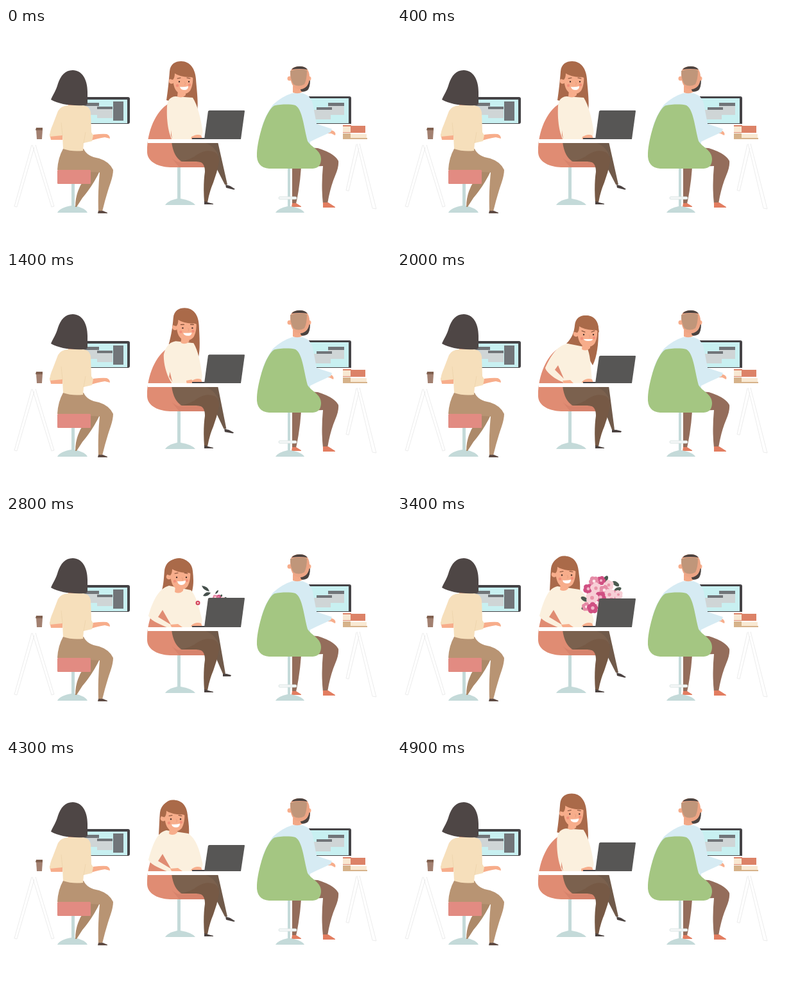
Animation, 600 px wide and 338 px high, one loop 5000 ms. Source, as an HTML page:

```html
<!DOCTYPE html>
<html lang="en">
<head>
<meta charset="utf-8">
<title>Office desks</title>
<style>
html, body { margin: 0; width: 100%; height: 100%; overflow: hidden; background: #fff; }
svg { display: block; width: 100vw; height: 100vh; }
.dark { fill: #454346; }
.screen { fill: #c8f0f1; }
.bar { fill: #717579; }
.pane { fill: #cfd5d6; }
.skin { fill: #f7ad8b; }
.steel { fill: #c4dad9; }
.chair { fill: #e08c73; }
.trestle { fill: none; stroke: #ececec; stroke-width: 1; }
.line { fill: none; stroke: #ecd3ab; stroke-width: .8; }
.brow { fill: none; stroke: #7b4a34; stroke-width: 1.1; stroke-linecap: round; }
</style>
</head>
<body>
<svg viewBox="0 0 600 338" preserveAspectRatio="none">
  <!-- left desk -->
  <path class="trestle" d="M40 183L13 279L17 280L44 187M41 183L71 280L75 279L46 183"/>
  <path class="dark" d="M116 108H190Q193 108 193 111V147Q193 150 190 150H116Z"/>
  <path class="screen" d="M113 112H189V149H113Z"/>
  <path class="pane" d="M121 122H145V136H121ZM142 127H166V141H142Z"/>
  <path class="bar" d="M121 117H145V122H121ZM142 123H166V127H142ZM167 115H183V145H167Z"/>
  <path fill="#a28070" d="M47 159H57L56 174H48Z"/>
  <path fill="#80604f" d="M47 156H57V160H46Z"/>
  <path class="steel" d="M102 244H107V278Q124 282 127 289H80Q84 281 102 278Z"/>
  <path fill="#ac8969" d="M120 222H147Q136 246 119 266L110 280H108Q108 257 121 238Z"/>
  <path fill="#b89473" d="M89 189H121Q126 201 145 204Q161 209 167 222Q167 230 163 242Q156 262 150 287H144Q143 256 146 226L80 222Q81 203 89 189Z"/>
  <path fill="#5d4a43" d="M144 286H151L158 289V290H143Z"/>
  <rect x="80" y="222" width="52" height="22" rx="1.5" fill="#e28b82"/>
  <path class="skin" d="M68 166L88 168V175H70ZM121 170Q142 165 157 166Q162 168 162 173L154 171Q141 173 123 179Z"/>
  <path class="skin" d="M97 112H115V126H97Z"/>
  <path fill="#f6dfbb" d="M97 121H118Q130 121 132 132L133 163L136 168L134 177L121 180L120 192Q103 194 89 189L88 168L68 170Q68 162 73 151L81 130Q85 122 97 121Z"/>
  <path class="line" d="M88 168L86 148M121 180L124 163"/>
  <path fill="#4e4645" d="M104 66C118 66 127 80 127 100V117Q127 121 122 121C100 122 82 119 70 112C74 103 78 98 81 87C85 75 92 66 104 66Z"/>

  <!-- middle desk -->
  <path class="chair" d="M254 118C232 130 219 166 220 195C221 211 240 218 258 218H309Q315 217 314 210L270 190Z"/>
  <path fill="#cf7c66" d="M258 203Q266 212 280 210H313Q314 217 309 218H270Z" opacity=".55"/>
  <path class="steel" d="M267 218H272V267Q290 270 295 277H248Q252 270 267 267Z"/>
  <path id="rearLeg" fill="#705a4a"/>
  <path id="rearShoe" fill="#4b4240"/>
  <path fill="#7b614e" d="M258 178H306Q326 184 331 200L314 213Q300 207 274 209Q261 202 258 178Z"/>
  <path fill="#765945" d="M270 209Q287 207 298 198Q312 189 325 194Q333 199 332 210Q329 226 323 242Q317 256 314 273H309Q307 245 310 225Q310 211 301 209Z"/>
  <path fill="#4b4240" d="M309 271L315 273L323 275V276H309Z"/>
  <path id="hair" fill="#a9694a"/>
  <path id="torso" fill="#fbf0de"/>
  <path id="gap" class="chair"/>
  <path id="hand" class="skin"/>
  <g id="head">
    <path class="skin" d="M268 98H280V105Q274 111 267 107Z"/>
    <circle class="skin" cx="258" cy="83" r="4.3"/>
    <path class="skin" d="M260 68H291C292 82 291 91 287 98C282 105 271 105 266 99C260 92 260 80 260 68Z"/>
    <path fill="#aa6a49" d="M256 80C255 64 262 54 273 54C286 54 293 63 294 81Q291 76 285 77Q270 76 263 71Q263 78 260 81Z"/>
    <g fill="#47312c"><circle cx="270" cy="84" r="1.2"/><circle cx="285" cy="84" r="1.2"/></g>
    <g fill="#f2907a"><circle cx="267" cy="90" r="2.2"/><circle cx="286" cy="89" r="2.2"/></g>
    <path d="M278 84Q281 88 278 89" fill="none" stroke="#e39a7b" stroke-width=".8"/>
    <path id="brows" class="brow"/>
    <path id="mouth" fill="#fff"/>
  </g>
  <g id="bouquet"></g>
  <g id="buds">
    <path fill="#46504c" d="M305 109Q315 110 317 118Q308 117 305 109ZM307 125Q311 117 319 120Q315 127 307 125ZM326 122Q327 117 331 116Q331 121 326 122Z"/>
    <circle cx="299" cy="136" r="3.5" fill="#d4475f"/><circle cx="299" cy="136" r="1.3" fill="#fbe3dc"/>
  </g>
  <path class="skin" d="M289 171Q296 165 304 168L306 173H288Z"/>
  <path fill="#454346" d="M290 172H312V174H290Z"/>
  <path id="lid" fill="#575655"/>
  <path fill="#fff" d="M221 174H372V180H221Z"/>

  <!-- right desk -->
  <path class="trestle" d="M546 182L530 254L534 255L550 188M547 181L571 282L577 283L551 181"/>
  <path class="dark" d="M472 107H535Q538 107 538 110V150H472Z"/>
  <path class="screen" d="M474 110H534V149H474Z"/>
  <path class="pane" d="M502 121H527V136H502ZM480 128H506V143H480Z"/>
  <path class="bar" d="M502 117H527V122H502ZM484 124H508V128H484Z"/>
  <path fill="#dc8267" d="M537 153H560V164H537ZM525 152H538V154H525ZM525 163H538V164H525Z"/>
  <path fill="#f8e8d2" d="M525 154H537V163H525ZM537 166H562V173H537Z"/>
  <path fill="#d6b28a" d="M525 165H537V174H525ZM537 172H563V174H537Z"/>
  <path fill="#946d5b" d="M446 218H460Q458 248 452 275H446ZM470 187L486 188Q512 196 518 208Q519 217 513 231Q505 250 501 275H494Q491 247 494 216L470 217Z"/>
  <path fill="#e27d60" d="M446 274H452L460 279V280H445ZM494 273H502L513 280V281H494Z"/>
  <path class="steel" d="M439 219H443V279Q461 282 465 289H420Q424 282 439 279Z"/>
  <rect x="425" y="264" width="28" height="4" rx="2" fill="#f4f7f7" stroke="#d5e0df" stroke-width=".8"/>
  <path id="reach" class="skin" d="M496 160Q505 158 511 161Q516 164 514 168L508 165L496 165Z"/>
  <path fill="#d6ebf3" d="M446 102H462Q475 106 478 118L484 150L508 158L506 163L484 173L474 178V192H410L398 158Q402 140 416 120Q430 107 446 102Z"/>
  <path fill="#f2a887" d="M447 91H462V100Q456 104 447 101Z"/>
  <path fill="#4b4340" d="M458 94L474 80Q474 95 469 98Q463 101 460 99Z"/>
  <g class="skin"><circle cx="442" cy="79" r="3.5"/><circle cx="472" cy="79" r="3.5"/></g>
  <path fill="#eda585" d="M443 72C443 62 450 60 458 60C468 60 473 66 473 77C473 89 467 95 459 96C449 96 443 89 443 72Z"/>
  <path fill="#c0967a" d="M443 67Q457 63 469 66Q469 80 465 88Q456 93 448 88Q443 80 443 67Z"/>
  <path fill="#4b4340" d="M445 65Q449 60 458 60Q466 60 470 65Q457 63 445 65Z"/>
  <path fill="#a4c682" d="M418 121.500C430 119 443 119 451 121C462 127 464 155 470 177C476 187 491 191 491 205Q491 219 478 220H410C397 219 390 211 391 196C392 174 404 130 418 121.500Z"/>
</svg>
<script>
const $ = id => document.getElementById(id);
const clamp = v => Math.max(0, Math.min(1, v));
const smooth = v => (v = clamp(v)) * v * (3 - 2 * v);
const ramp = (t, a, b) => smooth((t - a) / (b - a));

// Blends two strings that share the same layout of numbers.
function mix(a, b, k) {
  const nums = b.match(/-?[\d.]+/g);
  let i = 0;
  return a.replace(/-?[\d.]+/g, n => (+n + (nums[i++] - n) * k).toFixed(2));
}

const upright = {
  hair: 'M255 68C256 56 264 52 273 52C287 52 295 64 296 80C297 95 300 115 298 130L270 118L250 113C252 100 254 82 255 68Z',
  torso: 'M264 107C256 108 252 112 251 122C250 140 252 160 258 174C258 175 258 176 259 176L300 176C304 172 308 166 306 158C303 140 299 122 291 109Z',
  gap: 'M257 160L257 168L259 174Z',
  hand: 'M289 170L296 168L300 174L289 174Z',
  head: 'translate(0 0)',
  brows: 'M267 79L272 78M282 78L287 79',
  mouth: 'M271 92Q277 93 284 91Q284 97 278 97Q272 97 271 92Z',
  rearLeg: 'M298 178L330 178L345 245L341 245L316 196Z',
  rearShoe: 'M342 245L349 247L357 252L355 253L343 250Z'
};
const leaning = {
  hair: 'M277 84C278 72 285 68 294 68C308 68 315 78 314 92C314 112 312 132 305 146L290 120L264 112C272 104 276 95 277 84Z',
  torso: 'M266 112C250 115 240 130 231 150C232 156 246 168 258 172C260 174 262 176 264 176L300 176C304 172 304 166 303 160C302 145 301 128 296 118Z',
  gap: 'M251 146L246 153L260 167Z',
  hand: 'M258 170L270 169L275 174L260 174Z',
  head: 'translate(21 14)',
  brows: 'M267 78L272 80M282 80L287 78',
  mouth: 'M270 91Q277 91 284 91Q284 94 277 94Q271 94 270 91Z',
  rearLeg: 'M298 178L330 178L339 247L335 247L316 196Z',
  rearShoe: 'M335 247L342 247L350 249L349 251L335 251Z'
};
const amazed = {
  hair: 'M247 85C249 72 258 67 268 67C282 67 290 74 291 86C292 96 293 106 290 118L268 112L243 116C246 105 246 95 247 85Z',
  torso: 'M254 109C240 113 230 128 222 156C224 162 236 168 248 173C254 175 256 176 259 176L300 176C304 172 307 166 305 160C300 140 296 124 288 116Z',
  gap: 'M244 147L237 158L257 170Z',
  hand: 'M256 170L268 169L275 174L258 174Z',
  head: 'translate(-4 12)',
  brows: 'M267 78L272 77M282 77L287 78',
  mouth: 'M271 90Q277 91 284 89Q284 95 278 96Q272 96 271 90Z',
  rearLeg: 'M298 178L330 178L342 247L338 247L316 196Z',
  rearShoe: 'M338 247L344 247L351 249L350 251L338 251Z'
};
const happy = {
  ...upright,
  hair: 'M240 82C242 69 252 63 262 63C276 63 282 74 283 86C284 95 286 106 285 118L265 112L238 117C239 102 239 92 240 82Z',
  torso: 'M250 110C236 113 230 128 222 156C224 162 236 168 248 173C254 175 256 176 259 176L300 176C304 172 308 166 306 160C301 140 297 124 284 115Z',
  gap: amazed.gap,
  hand: amazed.hand,
  head: 'translate(-13 8.5)'
};
const keys = [[0, upright], [1200, upright], [1800, leaning], [2300, leaning], [2700, amazed],
  [2900, amazed], [3200, happy], [4300, happy], [5000, upright]];
const lidTops = [[0, 129], [1300, 129], [1900, 131], [2300, 131], [2800, 128], [3400, 129],
  [3900, 129], [4300, 133], [4900, 129], [5000, 129]];

function span(list, t) {
  const i = list.findIndex(k => k[0] > t);
  const [a, from] = list[i - 1], [b, to] = list[i];
  return [from, to, ramp(t, a, b)];
}

// Leaves: x, y, angle. Flowers: x, y, radius, colour index.
const leaves = [[292, 130, 30], [325, 99, -60], [341, 106, 35], [344, 115, -25], [293, 143, -25]];
const flowers = [[318, 101, 7, 0], [307, 102, 8, 1], [330, 108, 8, 2], [298, 114, 8, 0], [310, 113, 9, 2],
  [341, 124, 8, 1], [323, 116, 8, 1], [331, 123, 9, 2], [317, 127, 9, 0], [304, 128, 10, 2],
  [295, 142, 7, 1], [305, 144, 9, 0], [345, 123, 7, 2], [320, 139, 9, 2], [334, 137, 9, 1]];
const petals = ['#d04f82', '#e58ba6', '#f7cfd6'];
const hearts = ['#f2b6c9', '#fce6e8', '#e995a9'];

$('bouquet').innerHTML = leaves.map(([x, y, r]) =>
  `<ellipse rx="6" ry="3.2" fill="#4b5a50" transform="translate(${x} ${y}) rotate(${r})"/>`).join('') +
  flowers.map(([x, y, r, c]) => {
    let s = '';
    for (let i = 0; i < 5; i++) {
      const a = i * Math.PI * .4 + x;
      s += `<circle cx="${x + Math.cos(a) * r * .5}" cy="${y + Math.sin(a) * r * .5}" r="${r * .52}" fill="${petals[c]}"/>`;
    }
    return s + `<circle cx="${x}" cy="${y}" r="${r * .3}" fill="${hearts[c]}"/>`;
  }).join('');

function draw(t) {
  const [from, to, k] = span(keys, t);
  for (const id in upright)
    $(id).setAttribute(id === 'head' ? 'transform' : 'd', mix(from[id], to[id], k));

  const [y0, y1, m] = span(lidTops, t);
  const top = y0 + (y1 - y0) * m;
  $('lid').setAttribute('d', `M317 ${top}H371Q372 ${top} 372 ${top + 1}L366 174H309L315 ${top + 1}Z`);

  const size = ramp(t, 2500, 3100) * (1 - ramp(t, 3700, 4200));
  $('bouquet').setAttribute('transform', `translate(345 152) scale(${size}) translate(-345 -152)`);
  $('buds').style.display = t >= 2700 && t < 3000 ? '' : 'none';

  const tap = Math.pow((1 + Math.cos((t / 100 - 4) * Math.PI * .4)) / 2, 3);
  $('reach').setAttribute('transform', `translate(${-4 * tap} 0)`);
}

const start = performance.now();
function tick() {
  const t = (performance.now() - start) % 5000;
  draw(Math.floor(t / 100) * 100);
  requestAnimationFrame(tick);
}
tick();
</script>
</body>
</html>
```
